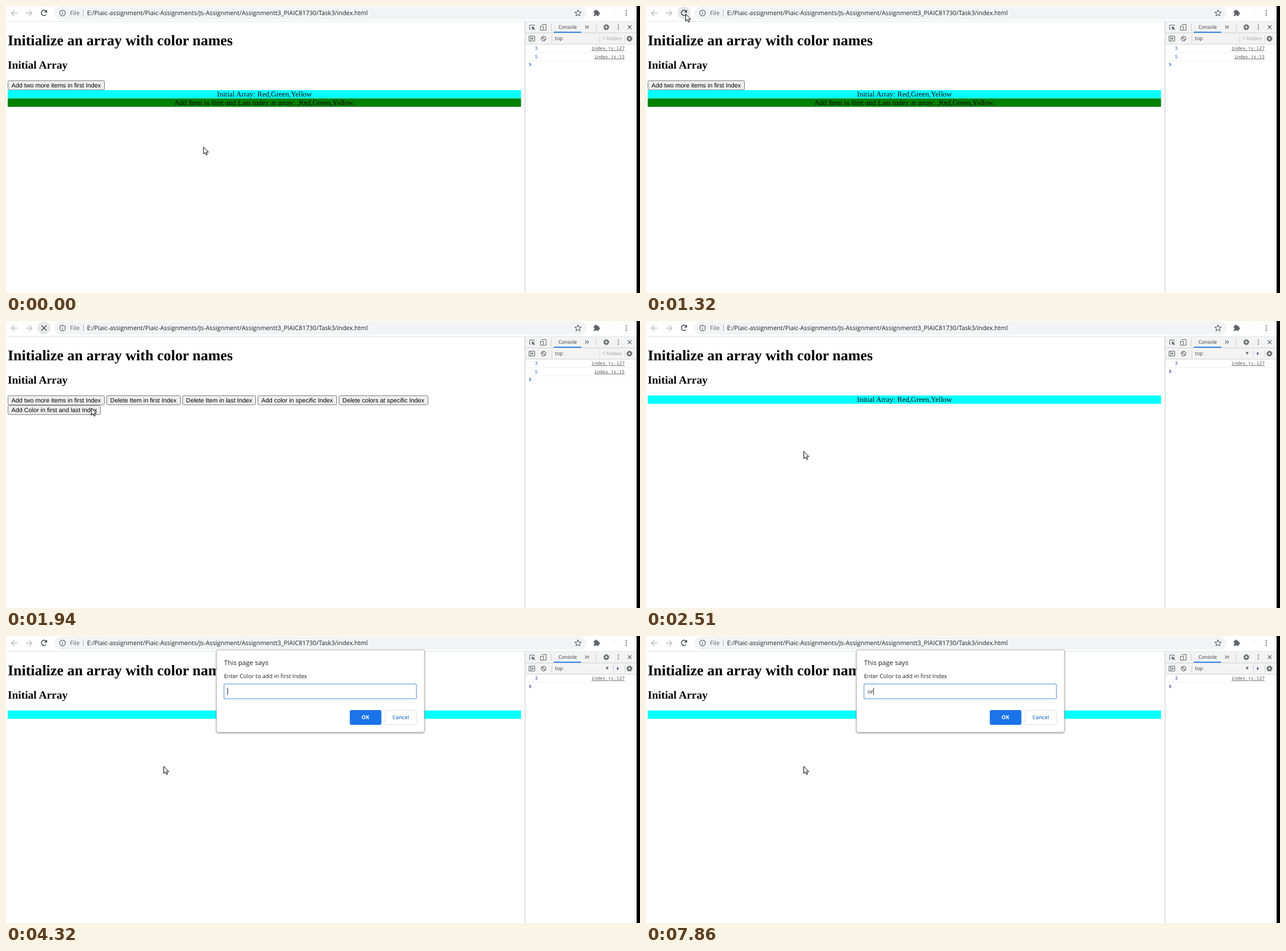
These frames come from a looping animation (1111 by 504 pixels, 8000 ms). An HTML page:

```html
<!DOCTYPE html>
<html lang="en">
<head>
<meta charset="utf-8">
<title>Array of color names</title>
<style>
  html, body { margin: 0; width: 100%; height: 100%; overflow: hidden; background: #fff; }
  svg { display: block; width: 100%; height: 100%; }
  text { text-rendering: geometricPrecision; white-space: pre; }
  .ui { font-family: "Open Sans", "Noto Sans", sans-serif; }
  .serif { font-family: "Liberation Serif", serif; }
  .sans { font-family: "Liberation Sans", sans-serif; }
  .mono { font-family: "Noto Sans Mono", "DejaVu Sans Mono", monospace; }
  .card { filter: drop-shadow(0 1px 1.5px rgba(0, 0, 0, .5)); }
</style>
</head>
<body>
<svg id="stage" viewBox="0 0 1111 504" xmlns="http://www.w3.org/2000/svg"></svg>
<script>
const LOOP = 8000;
const INK = '#5f6368';

// Markup helpers
const rect = (x, y, w, h, fill, more = '') =>
  `<rect x="${x}" y="${y}" width="${w}" height="${h}" fill="${fill}" ${more}/>`;
const circle = (x, y, r, fill, more = '') =>
  `<circle cx="${x}" cy="${y}" r="${r}" fill="${fill}" ${more}/>`;
const line = (d, color = INK, width = 1, more = '') =>
  `<path d="${d}" fill="none" stroke="${color}" stroke-width="${width}" ${more}/>`;
const shape = (d, fill = INK) => `<path d="${d}" fill="${fill}"/>`;
const text = (x, y, size, font, str, fill = '#000', more = '') =>
  `<text x="${x}" y="${y}" font-size="${size}" class="${font}" fill="${fill}" ${more}>${str}</text>`;
const group = (id, body) => `<g id="${id}">${body}</g>`;

const dots = (x, y, gap, r) => [-1, 0, 1].map(k => circle(x, y + k * gap, r, INK)).join('');
const gear = (x, y) =>
  circle(x, y, 2.9, 'none', `stroke="${INK}" stroke-width="2"`) +
  circle(x, y, 4.5, 'none', `stroke="${INK}" stroke-width="1.5" stroke-dasharray="1.9 1.634"`);

function star(x, y, r) {
  let d = '';
  for (let k = 0; k < 10; k++) {
    const a = (k / 5 - .5) * Math.PI, q = k % 2 ? r * .45 : r;
    d += (k ? 'L' : 'M') + (x + q * Math.cos(a)).toFixed(2) + ' ' + (y + q * Math.sin(a)).toFixed(2);
  }
  return line(d + 'Z', INK, 1.1, 'stroke-linejoin="round"');
}

function toolbar() {
  const url = 'E:/Piaic-assignment/Piaic-Assignments/Js-Assignment/Assignmentt3_PIAIC81730/Task3/index.html';
  return rect(0, 0, 1105, 27, '#fff') +
    rect(0, 26.5, 1105, 1, '#dcdee0') +
    rect(85, 1, 932, 23, '#f1f3f4', 'rx="11.5"') +
    line('M20 12.5H9.5M14.5 7.5L9.5 12.5L14.5 17.5', '#bcbec1', 1.4) +
    line('M35 12.5H45.5M40.5 7.5L45.5 12.5L40.5 17.5', '#bcbec1', 1.4) +
    circle(66.5, 12, 11.2, '#e6e7e8', 'id="hover"') +
    group('reload', line('M70.3 15.2A4.7 4.7 0 1 1 70 8.7', '#4a4d51', 1.6) + shape('M72 6.3V11.5H66.8Z', '#4a4d51')) +
    group('stop', line('M62 7.7L71 16.7M71 7.7L62 16.7', '#4a4d51', 1.5)) +
    circle(99, 12.3, 5, 'none', `stroke="${INK}" stroke-width="1.2"`) +
    line('M99 11.6V15.2M99 9.4V10.6', INK, 1.2) +
    text(112, 16.3, 10.7, 'ui', 'File', INK) +
    rect(135, 6, 1, 12, '#b4b7ba') +
    text(142, 16.3, 10.82, 'ui', url, '#202124') +
    star(1002.3, 12.6, 5.9) +
    rect(1030, 8.5, 8.6, 9, INK, 'rx="1"') + circle(1034, 8.3, 1.9, INK) + circle(1039, 12.8, 1.9, INK) +
    circle(1030, 13.2, 1.5, '#fff') + circle(1034.2, 17.6, 1.5, '#fff') +
    circle(1064, 12, 6, '#fbfbfb') +
    dots(1087, 12.4, 4, 1.15);
}

const button = (x, y, w, label) =>
  rect(x + .5, y + .5, w - 1, 16, '#efefef', 'rx="2.2" stroke="#767676"') +
  text(x + 6.6, y + 12.2, 10.8, 'sans', label);
const bar = (y, color, label) =>
  rect(3, y, 899.5, 14.6, color) + text(452.9, y + 11.6, 12.96, 'serif', label, '#000', 'text-anchor="middle"');

function page() {
  const first = button(3, 130.6, 170, 'Add two more items in first Index');
  const initial = 'Initial Array: Red,Green,Yellow';
  return text(3, 69, 25.9, 'serif', 'Initialize an array with color names', '#000', 'font-weight="700"') +
    text(3, 110, 19.4, 'serif', 'Initial Array', '#000', 'font-weight="700"') +
    group('before', first + bar(147.8, '#0ff', initial) +
      bar(162.4, '#008000', 'Add Item in first and Last index at array: ,Red,Green,Yellow,')) +
    group('loading', first +
      button(176, 130.6, 130, 'Delete Item in first Index') +
      button(309, 130.6, 129, 'Delete Item in last Index') +
      button(441, 130.6, 139, 'Add color in specific Index') +
      button(583, 130.6, 157, 'Delete colors at specific Index') +
      button(3, 147.8, 163, 'Add Color in first and last Index')) +
    group('after', bar(130.8, '#0ff', initial));
}

const logRow = (id, y, value, place) => group(id,
  text(926.8, y + 3, 8.05, 'mono', value, 'currentColor') +
  text(1084, y + 3, 8.05, 'mono', place, '#545454', 'text-anchor="end" text-decoration="underline"') +
  rect(910, y + 7, 195, 1, '#f0f0f0'));

function devtools() {
  return rect(909, 28, 196, 476, '#fff') +
    rect(910, 28, 195, 39, '#f3f3f3') +
    rect(909, 28, 1, 476, '#c8c8c8') +
    rect(910, 46.7, 195, 1, '#cfcfcf') + rect(910, 66.5, 195, 1, '#cfcfcf') +
    line('M925.5 35.5V33.5H917.5V40.5H920') + shape('M920.8 35.8L927.2 38.3L924.6 39.2L927 41.8L926 42.7L923.5 40.2L922.5 42.6Z') +
    line('M939.5 33.5V32.5H946.5V42.5H942.5M936.5 35.5H941.5V42.5H936.5Z') +
    rect(955, 31, 1, 13, '#ccc') +
    text(968, 40.3, 8.65, 'ui', 'Console', '#333') +
    rect(960, 45.2, 48, 1.7, '#1a73e8') +
    line('M1015 34.5L1017.5 37L1015 39.5M1018.5 34.5L1021 37L1018.5 39.5', INK, 1.1) +
    rect(1034, 31, 1, 13, '#ccc') +
    gear(1052, 37.2) + dots(1073, 37.2, 3.6, 1) +
    line('M1089.7 34L1096 40.3M1096 34L1089.7 40.3', INK, 1.2) +
    line('M916.5 53H926.5V61.5H916.5ZM919.5 53V61.5') + shape('M921.5 55V59.6L925 57.3Z') +
    circle(942, 57.3, 4, 'none', `stroke="${INK}" stroke-width="1.2"`) + line('M939.2 54.5L944.8 60.1', INK, 1.2) +
    rect(956, 51, 1, 13, '#ccc') +
    text(962, 60.2, 9, 'ui', 'top', '#444') +
    group('hiddenCount', rect(1040, 51, 1, 13, '#d4d4d4') + text(1045, 60.2, 8.4, 'ui', '1 hidden', '#9a9da0')) +
    group('context', shape('M1050.8 54.6H1056L1053.4 59.2Z') + rect(1064, 51, 1, 13, '#ccc') +
      shape('M1073 54.2V60L1069.8 57.1Z', '#3c3f9c')) +
    rect(1084, 51, 1, 13, '#d4d4d4') +
    gear(1092.5, 57.2) +
    group('logs', logRow('logA', 74, '3', 'index.js:127') + logRow('logB', 88.7, '5', 'index.js:15') +
      line('M917 100L919.8 102.7L917 105.4', 'currentColor', 1.2, 'id="prompt"')) +
    rect(1105, 0, 6, 504, '#000');
}

function dialog() {
  return group('dialog',
    rect(369, 24.5, 364, 144.5, '#fff', 'rx="3" stroke="#bdbdbd" stroke-width=".8" class="card"') +
    text(382, 51, 11.58, 'ui', 'This page says', '#202124') +
    text(382, 73.8, 10, 'ui', 'Enter Color to add in first Index', '#202124') +
    rect(382, 84.3, 337.3, 26, '#fff', 'rx="2.5" stroke="#84aeea" stroke-width="1.5"') +
    text(388.3, 100.8, 10, 'ui', '', '#202124', 'id="typed"') +
    rect(388, 91, 1, 12, '#202124', 'id="caret"') +
    rect(602.5, 130, 55.3, 26, '#1a73e8', 'rx="3"') +
    text(630, 146.4, 9.5, 'ui', 'OK', '#fff', 'text-anchor="middle" font-weight="700"') +
    rect(664.5, 130.5, 54.5, 25, '#fff', 'rx="3" stroke="#dadce0"') +
    text(691.7, 146.4, 9.1, 'ui', 'Cancel', '#2a72d4', 'text-anchor="middle" font-weight="600"'));
}

const pointers = group('arrow',
    '<path d="M.5 .5V13L3.4 10.3L5.4 14.8L7.3 14L5.4 9.6H9.3Z" fill="#fff" stroke="#000" stroke-width="1"/>') +
  group('beam', line('M0 0.5H2.3M3.7 0.5H6M3 1V12M0 12.5H2.3M3.7 12.5H6', '#000'));

const stage = document.getElementById('stage');
stage.innerHTML = rect(0, 0, 1111, 504, '#fff') + page() + toolbar() + devtools() + dialog() + pointers;

const el = {};
stage.querySelectorAll('[id]').forEach(n => { el[n.id] = n; });
const show = (id, on) => { el[id].style.display = on ? '' : 'none'; };

// Progress 0..1 in n held positions between two times
function held(t, from, to, n) {
  const k = Math.floor((t - from) / (to - from) * (n - 1) + .1);
  return Math.min(Math.max(k, 0), n - 1) / (n - 1);
}

function along(points, f) {
  const p = f * (points.length - 1), i = Math.min(Math.floor(p), points.length - 2), u = p - i;
  return [0, 1].map(c => points[i][c] + (points[i + 1][c] - points[i][c]) * u);
}

const toReload = [[102, 60], [106, 48], [97, 37], [84, 28], [75, 22], [70, 20]];
const settle = [[70, 20], [69, 16], [69, 13.5], [69, 13.5]];
const away = [[75, 32], [149, 152.5], [190, 182], [222, 202], [248, 216], [266, 225], [276, 228.5]];

function pointerAt(t) {
  if (t < 70) return [345.5, 247];
  if (t < 210) return [100, 65];
  if (t < 1020) return along(toReload, held(t, 210, 940, 10));
  if (t < 1860) return along(settle, held(t, 1020, 1480, 7));
  return along(away, held(t, 1860, 2360, 7));
}

function drawDialog(t) {
  show('dialog', t >= 4160);
  if (t < 4160) return;
  const phase = t < 4240 ? 0 : t < 4320 ? 1 : 2;
  const lift = [-13, -4, 0][phase], scale = [1.012, 1.004, 1][phase];
  el.dialog.setAttribute('opacity', [.19, .72, 1][phase]);
  el.dialog.setAttribute('transform', `translate(551 ${24 + lift}) scale(${scale}) translate(-551 -24)`);
  const typed = t >= 7860 ? 'or' : t >= 7710 ? 'o' : '';
  el.typed.textContent = typed;
  el.caret.setAttribute('x', [388, 394.3, 398.2][typed.length]);
  const blinks = [4690, 5160, 5710, 6260, 6780, 7330].filter(b => t >= b).length;
  show('caret', blinks % 2 === 0);
}

function draw(t) {
  show('before', t < 1940);
  show('loading', t >= 1940 && t < 2190);
  show('after', t >= 2190);

  const stopping = t >= 1860 && t < 2190;
  show('stop', stopping);
  show('reload', !stopping);
  show('hover', t >= 1020 && t < 2190);
  el.hover.setAttribute('opacity', held(t, 940, 1180, 4));

  const cleared = t >= 2110, logged = t >= 2510;
  show('hiddenCount', !cleared);
  show('context', cleared);
  show('logA', !cleared || logged);
  show('logB', !cleared);
  el.prompt.setAttribute('transform', `translate(0 ${!cleared ? 0 : logged ? -14 : -28.7})`);
  el.logs.setAttribute('color', cleared ? '#3030b4' : '#1f5fc4');

  const [x, y] = pointerAt(t), beam = t >= 70 && t < 210;
  show('beam', beam);
  show('arrow', !beam);
  el[beam ? 'beam' : 'arrow'].setAttribute('transform', `translate(${x} ${y})`);

  drawDialog(t);
}

const start = performance.now();
function tick() {
  draw((performance.now() - start) % LOOP);
  requestAnimationFrame(tick);
}
tick();
</script>
</body>
</html>
```
